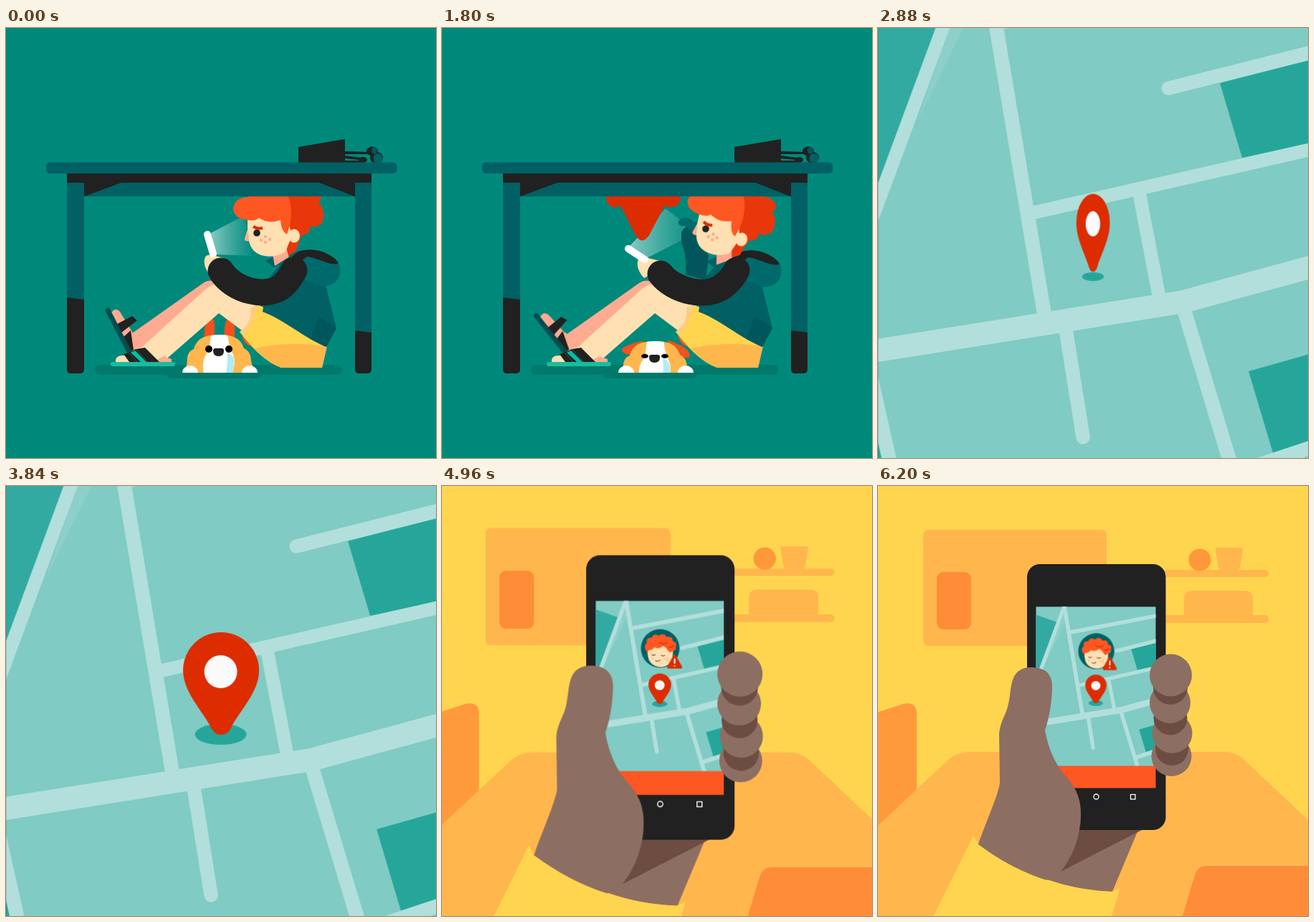
An HTML page that plays this animation: 600x600 px, repeating every 6240 ms.

```html
<!DOCTYPE html>
<html lang="en">
<head>
<meta charset="utf-8">
<title>Under the desk</title>
<style>
@property --d { syntax: '<number>'; inherits: true; initial-value: 1; }
html, body { margin: 0; width: 100%; height: 100%; overflow: hidden; background: #00897b; }
svg { display: block; width: 100vw; height: 100vh; animation: camera 6240ms infinite; }
svg .a { animation: 6240ms infinite ease-in-out; }

/* --d is the camera distance; the phone scales by 1/d */
@keyframes camera {
  0%, 62.18% { --d: .2783; animation-timing-function: cubic-bezier(0, .54, .165, 1); }
  99.36%, 100% { --d: 1; }
}
.room { transform-origin: 304px 302px; transform: scale(calc(1 + (1 / var(--d) - 1) * .13)); }
.near { transform-origin: 305.5px 286px; transform: scale(calc(1 / var(--d))); }

svg .desk { animation-name: desk; animation-timing-function: step-end; }
@keyframes desk { 0% { visibility: visible; } 41.66%, 100% { visibility: hidden; } }

svg .head { transform-origin: 402px 290px; animation-name: head; }
@keyframes head {
  0%, 23% { transform: none; }
  28%, 100% { transform: translate(16px, 5px) rotate(12deg); }
}
svg .torso { animation-name: torso; }
@keyframes torso { 0%, 23% { transform: none; } 28%, 100% { transform: translate(7px, 1px); } }

svg .arm { animation-name: arm; }
@keyframes arm {
  0%, 23% { d: path("M300 339C316 366 365 380 388 358C394 352 398 345 402 338"); }
  28%, 100% { d: path("M305 343C322 366 370 380 395 358C402 352 407 346 411 338"); }
}
svg .hand { animation-name: hand; }
@keyframes hand { 0%, 23% { transform: none; } 28%, 100% { transform: translate(-4px, 3px); } }

svg .cell { animation-name: cell; }
@keyframes cell {
  0%, 23% { d: path("M281 288L289 315"); }
  28%, 100% { d: path("M260 308L283 323"); }
}
svg .beam { animation-name: beam; }
@keyframes beam {
  0%, 23% { d: path("M286 286L332 262L344 318L292 316Z"); }
  28%, 100% { d: path("M262 304L312 252L356 285L288 320Z"); }
}
svg .raised { transform-origin: 368px 350px; animation-name: raised; }
@keyframes raised { 0%, 24% { transform: scale(0); } 28%, 100% { transform: none; } }

svg .foot { transform-origin: 176px 452px; animation-name: foot; }
@keyframes foot {
  0%, 10%, 20% { transform: none; }
  5%, 15%, 26%, 100% { transform: rotate(-11deg); }
}
svg .dog { animation-name: dog; }
@keyframes dog { 0%, 23% { transform: none; } 27%, 100% { transform: translateY(9px); } }
svg .earL { transform-origin: 281px 436px; animation-name: earL; }
@keyframes earL { 0%, 23% { transform: none; } 27%, 100% { transform: rotate(-112deg); } }
svg .earR { transform-origin: 314px 436px; animation-name: earR; }
@keyframes earR { 0%, 23% { transform: none; } 27%, 100% { transform: rotate(112deg); } }
svg .eyes { transform-origin: 297px 450px; animation-name: eyes; }
@keyframes eyes { 0%, 23% { transform: none; } 27%, 100% { transform: scaleY(.6); } }

svg .drop { animation-name: drop; }
@keyframes drop { 0%, 22.5% { transform: translateY(-72px); } 28%, 100% { transform: none; } }

svg .pin, svg .shade { transform-origin: 300px 347px; }
svg .pin { animation-name: pin; }
@keyframes pin {
  0%, 41.66% { transform: scale(0); }
  46.15% { transform: translateY(-7px) scale(.76); }
  50% { transform: scale(1.08); }
  55% { transform: scale(.98); }
  60%, 100% { transform: none; }
}
svg .spin { transform-origin: 300px 347px; animation-name: spin; }
@keyframes spin {
  0%, 41.66% { transform: scaleX(.2); }
  46.15% { transform: scaleX(.58); }
  49% { transform: none; }
  52% { transform: scaleX(.55); }
  56% { transform: scaleX(1.08); }
  61%, 100% { transform: none; }
}
svg .shade { animation-name: shade; }
@keyframes shade {
  0%, 41.66% { transform: scale(0); }
  46.15% { transform: scale(.42); }
  50% { transform: scale(1.06); }
  55%, 100% { transform: none; }
}
svg .badge { animation-name: badge; }
@keyframes badge {
  0%, 63.5% { transform: scale(0); }
  66.7% { transform: scale(1.1); }
  68.3%, 100% { transform: none; }
}
svg .palm { animation-name: palm; animation-timing-function: ease-out; }
@keyframes palm { 0%, 62.18% { transform: translate(-45px, 20px); } 67.5%, 100% { transform: none; } }
svg .fingers { animation-name: fingers; animation-timing-function: ease-out; }
@keyframes fingers { 0%, 62.18% { transform: translateX(28px); } 67.5%, 100% { transform: none; } }
</style>
</head>
<body>
<svg viewBox="0 0 600 600">
  <defs>
    <clipPath id="screen"><rect x="220.5" y="168.5" width="167" height="253"/></clipPath>
    <clipPath id="floor"><rect x="230" y="380" width="140" height="101"/></clipPath>
    <clipPath id="under"><rect x="200" y="230" width="170" height="120"/></clipPath>
    <linearGradient id="glow">
      <stop offset="0" stop-color="#b2dfdb" stop-opacity=".75"/>
      <stop offset="1" stop-color="#80cbc4" stop-opacity=".05"/>
    </linearGradient>
  </defs>

  <!-- living room -->
  <rect width="600" height="600" fill="#ffd54f"/>
  <g class="room" fill="#ffb74d">
    <rect x="63" y="61" width="256" height="162" rx="7"/>
    <rect x="82" y="120" width="48" height="80" rx="9" fill="#ff8c38"/>
    <rect x="350" y="117" width="195" height="10" rx="5"/>
    <rect x="350" y="180" width="195" height="11" rx="5"/>
    <circle cx="449" cy="103" r="15.5" fill="#ff9838"/>
    <path d="M474 86H506Q510 86 509 90L505 114Q504 117 501 117H479Q476 117 475 114L471 90Q470 86 474 86Z"/>
    <path d="M427 181V158Q427 146 439 146H511Q523 146 523 158V181Z"/>
    <path d="M-80 342L35 304Q54 300 54 318V440L-80 560Z" fill="#ff9a3c"/>
    <path d="M-120 586L97 383Q110 371 128 371H484Q500 371 512 383L728 586V760H-120Z"/>
    <path d="M410 650L442 543Q446 530 459 530H760V760H410Z" fill="#ff8c38"/>
  </g>

  <!-- phone in hand -->
  <g class="near">
    <g class="a palm">
      <path d="M140 500L200 430H384L327 566Q225 562 140 500Z" fill="#8d6e63"/>
      <path d="M240 440H380L368 480L255 538Z" fill="#6d4c41"/>
      <path d="M133 488L140 500Q235 564 327 566L338 560L296 700H28Z" fill="#ffd54f"/>
    </g>
    <rect x="208" y="109" width="193.500" height="371" rx="18" fill="#212121"/>
    <g clip-path="url(#screen)">
      <g transform="translate(304 303) scale(.2783) translate(-300 -347)">
        <rect x="-5" y="-140" width="610" height="810" fill="#80cbc4"/>
        <g fill="#26a69a">
          <path d="M-5 -98L105 -59L-5 250Z" fill="#33aaa1"/>
          <path d="M477 77L605 44V160L508 181ZM517 479L605 454V577L551 593ZM-5 555L20 670H-5Z"/>
        </g>
        <path d="M100 0L143 -110L143 -60L119 0L55 130Z" fill="#b2dfdb" opacity=".25"/>
        <g fill="none" stroke="#b2dfdb" stroke-width="20">
          <path d="M145 -148L-20 297" stroke-width="18.700"/>
          <path d="M141 -144L232 400M170 -8L610 -92M497 621L620 580M-18 452L32 675M426 390L512 675"/>
          <path d="M405 84L620 30M261 415L286 571" stroke-width="19.500" stroke-linecap="round"/>
          <path d="M215 258L610 168M364 228L394 385" stroke-width="18.700"/>
          <path d="M-20 453L425 382L620 329" stroke-width="32"/>
        </g>
        <ellipse class="a shade" cx="299.500" cy="346.500" rx="36" ry="14.500" fill="#26a69a"/>
        <g class="a pin"><g class="a spin">
          <path d="M300 347C294 347 290 344 287 339C275 314 247 288 247 257A53 53 0 0 1 353 257C353 288 325 314 313 339C310 344 306 347 300 347Z" fill="#dd2c00"/>
          <circle cx="299.500" cy="259" r="23" fill="#fafafa"/>
        </g></g>
      </g>
      <rect x="220" y="390.500" width="168" height="32" fill="#ff5722"/>
    </g>
    <g fill="none" stroke="#fff" stroke-width="1.300">
      <circle cx="304.500" cy="433.500" r="3.500"/>
      <rect x="352.500" y="430.500" width="6.500" height="6.500"/>
    </g>

    <g transform="translate(304.500 230.500) scale(.785)"><g class="a badge">
      <circle r="32" fill="#006064"/>
      <path d="M-21 4Q-22 30 2 31Q23 29 21 2L14 -10H-16Z" fill="#ffe0b2"/>
      <path d="M-25 0Q-27 -6 -22 -9Q-25 -18 -14 -18Q-11 -26 -2 -21Q6 -27 11 -19Q21 -21 21 -12Q29 -10 26 -3Q27 5 20 4Q18 9 13 4Q10 -2 5 -4Q-3 2 -9 -2Q-14 3 -19 3Q-22 10 -25 0Z" fill="#ff5722"/>
      <path d="M-2 -10Q6 -5 12 -10M14 -3Q19 0 23 -5" fill="none" stroke="#dd2c00" stroke-width="1.500"/>
      <path d="M-14 10Q-11 13 -8 10M1 11Q5 14 8 11M-8 20Q-4 23 0 19" fill="none" stroke="#8d4a35" stroke-width="1.400"/>
      <g fill="#ffab91"><circle cx="12" cy="16" r="1.300"/><circle cx="8" cy="18" r="1.300"/><circle cx="-13" cy="16" r="1.300"/><circle cx="12" cy="20" r="1.300"/></g>
      <path d="M24 13L34 31H14Z" fill="#dd2c00" stroke="#dd2c00" stroke-width="5" stroke-linejoin="round"/>
      <path d="M24 17V25M24 28V30" stroke="#fff" stroke-width="2.400"/>
    </g></g>

    <g class="a palm">
      <path d="M140 500C150 470 166 436 170 415L169 345C171 327 179 319 182 304C187 284 182 253 214 253C240 253 244 270 243 284C242 307 238 326 233 341C238 368 248 390 263 406C280 425 285 444 282.500 470C279 500 268 522 255 538L235 550Q185 534 140 500Z" fill="#8d6e63"/>
    </g>
    <g class="a fingers" fill="#8d6e63">
      <circle cx="409.500" cy="377" r="28"/>
      <circle cx="410" cy="367" r="23" fill="#6d4c41"/>
      <circle cx="410.500" cy="345" r="28"/>
      <circle cx="408" cy="324" r="23.500" fill="#6d4c41"/>
      <circle cx="407.500" cy="302.500" r="28.500"/>
      <circle cx="408" cy="281" r="24" fill="#6d4c41"/>
      <circle cx="408.500" cy="264" r="29.500"/>
    </g>
  </g>

  <!-- boy under the desk -->
  <g class="a desk">
    <rect width="600" height="600" fill="#00897b"/>
    <g fill="#00796b">
      <rect x="124" y="470" width="345" height="14" rx="7"/>
      <rect x="224" y="476" width="131" height="13" rx="6"/>
    </g>

    <path class="a beam" d="M286 286L332 262L344 318L292 316Z" fill="url(#glow)"/>
    <g class="a raised" fill="#00565a">
      <path d="M334 286Q338 274 353 276L372 318L368 352L340 344Q342 316 334 300Z"/>
      <path d="M330 270Q334 262 346 266L356 272L350 284L338 276Q329 277 330 270Z" fill="#00696b"/>
    </g>

    <!-- far leg -->
    <path d="M186 438L285 368" stroke="#ffab91" stroke-width="31" stroke-linecap="round"/>
    <g class="a foot">
      <path d="M147 397Q153 389 159 396L176 424L186 432L180 452H170Z" fill="#ffab91"/>
      <path d="M155 413L176 402L183 408L161 425ZM164 431L174 422L178 449L172 452Z" fill="#212121"/>
      <path d="M142 394L171 450" stroke="#004d4f" stroke-width="7" stroke-linecap="round"/>
    </g>

    <g clip-path="url(#floor)"><g class="a dog">
      <path class="a earL" d="M277 438C275 416 280 404 290 407C292 417 291 430 289 438Z" fill="#f4511e"/>
      <path class="a earR" d="M305 438C303 416 307 400 317 402C320 412 320 430 318 438Z" fill="#f4511e"/>
    </g></g>

    <path d="M330 420L350 426L346 444Q336 446 330 432Z" fill="#ff5722"/>
    <path d="M181 453L277 366Q293 350 311 363L362 394L348 436L297 398L219 466H196Z" fill="#ffe0b2"/>
    <path d="M352 386C380 402 425 412 449 438L441 474H384C362 466 343 446 326 424Q345 410 352 386Z" fill="#ffd54f"/>
    <path d="M347 447Q395 436 448 444L441 474H384Q362 464 347 447Z" fill="#ffb74d"/>
    <path d="M341 391L352 386Q345 410 334 427L326 424Q344 410 341 391Z" fill="#ffcc80"/>

    <!-- near foot -->
    <path d="M153 466Q152 456 166 457L184 446L204 448L229 463V466Z" fill="#ffe0b2"/>
    <path d="M205 466L220 458L231 462V466Z" fill="#ffab91"/>
    <path d="M164 455L171 453L183 466H172ZM181 448L194 446L214 466H198Z" fill="#212121"/>
    <path d="M171 453L181 448L198 466H183Z" fill="#212121"/>
    <path d="M174 453L180 450L196 466H188Z" fill="#00bfa5"/>
    <path d="M149 469H233" stroke="#1abc9c" stroke-width="6" stroke-linecap="round"/>

    <!-- hoodie -->
    <path d="M384 328C420 326 440 342 447 362L461 419L447 445C415 432 385 405 358 396L366 350Z" fill="#006064"/>
    <path d="M436 402L461 419L447 445L425 434Z" fill="#00575b"/>
    <g class="a torso">
      <path d="M392 316C420 303 456 313 465 330C471 350 456 362 440 360L412 350Z" fill="#00696b"/>
      <path d="M408 312C430 304 456 315 464 328C456 334 434 320 420 319L398 336L390 326Z" fill="#212121"/>
      <path d="M362 325L376 318L398 322L374 334Z" fill="#006064"/>
    </g>

    <g class="a head">
      <path d="M370 305H399L394 320L375 332Z" fill="#ffab91"/>
      <path d="M392 225H428Q446 232 436 244Q446 252 442 270Q434 281 424 276Q426 287 412 290L404 312L394 318L386 285Z" fill="#e8380b"/>
      <path d="M337 262V282L333 294Q333 298 339 297Q342 312 356 317Q374 322 390 312L399 290L390 255H345Z" fill="#ffe0b2"/>
      <path d="M338 283L333 294Q333 298 339 297Z" fill="#ffab91"/>
      <ellipse cx="402" cy="290" rx="8" ry="9.500" fill="#ffe0b2"/>
      <path d="M338 268Q318 266 317 252Q319 236 338 236L350 222H388Q401 245 397 270Q395 280 392 288Q384 284 383 268Q366 274 353 265Q347 270 338 268Z" fill="#ff5722"/>
      <path d="M345 277Q351 281 358 279" fill="none" stroke="#dd2c00" stroke-width="4"/>
      <circle cx="350" cy="286" r="4.800" fill="#212121"/>
      <g fill="#ffab91">
        <circle cx="356" cy="296" r="2.200"/><circle cx="362" cy="291" r="2.200"/>
        <circle cx="368" cy="295" r="2.200"/><circle cx="362" cy="299" r="2.200"/>
      </g>
    </g>

    <path class="a hand" d="M277 323Q278 315 288 317L308 322L306 334L286 346Q275 334 277 323Z" fill="#ffe0b2"/>
    <path class="a arm" d="M300 339C316 366 365 380 388 358C394 352 398 345 402 338" fill="none" stroke="#212121" stroke-width="37" stroke-linecap="round"/>
    <path class="a cell" d="M281 288L289 315" stroke="#fff" stroke-width="10" stroke-linecap="round"/>

    <g clip-path="url(#floor)">
      <g class="a dog">
        <path d="M250 500V475C256 468 248 454 262 448C266 434 276 428 297 428C318 428 328 434 332 447C346 454 339 466 346 475V500Z" fill="#ffb74d"/>
        <path d="M286 429Q298 427 310 429C309 445 320 455 319 469L312 500H282C270 472 275 460 283 450Z" fill="#fff"/>
        <path d="M308 452C318 455 320 465 318 474L313 500H303Q311 470 308 452Z" fill="#b2ebf2"/>
        <g class="a eyes"><circle cx="283" cy="448" r="5"/><circle cx="311" cy="448" r="5"/></g>
        <path d="M289 450Q289 446 296.500 447Q305 446 304 451Q304 458 296.500 458Q289 458 289 450Z" fill="#212121"/>
      </g>
      <ellipse cx="257" cy="481" rx="11" ry="10" fill="#fff"/>
      <ellipse cx="340" cy="481" rx="11" ry="10" fill="#fff"/>
    </g>

    <g clip-path="url(#under)">
      <path class="a drop" d="M229 190V238C230 246 236 250 241 250Q246 251 249 247Q251 253 255 259L270 289Q279 304 289 289L305 259Q309 253 311 247Q314 251 319 250C327 250 333 244 333 236V190Z" fill="#dd2c00"/>
    </g>

    <!-- table -->
    <g fill="#006064">
      <rect x="109" y="210" width="378" height="25"/>
      <path d="M85 203H109V390H85ZM487 203H510V430H487Z"/>
    </g>
    <g fill="#212121">
      <path d="M85 203H510V216H438L487 235V216H160L109 235V216H85Z"/>
      <path d="M438 216H487V235ZM160 216H109V235Z"/>
      <path d="M85 376L109 379V476Q109 482 103 482H91Q85 482 85 476ZM487 422L510 425V476Q510 482 504 482H493Q487 482 487 476Z"/>
      <path d="M408 166L473 155V188H408Z"/>
      <path d="M473 172L506 173V176L473 176ZM473 178L503 182V185L473 182Z"/>
      <path d="M473 185H500V188H473Z"/>
      <ellipse cx="511" cy="172" rx="8" ry="6.500"/>
      <ellipse cx="498" cy="184" rx="6" ry="4"/>
    </g>
    <ellipse cx="517" cy="181" rx="9" ry="8" fill="#212121"/>
    <ellipse cx="519" cy="182" rx="6.500" ry="7" fill="#006064"/>
    <ellipse cx="514" cy="171" rx="4" ry="5" fill="#00565a"/>
    <rect x="56" y="187.500" width="489.500" height="15.500" rx="5" fill="#006064"/>
  </g>
</svg>
</body>
</html>
```
